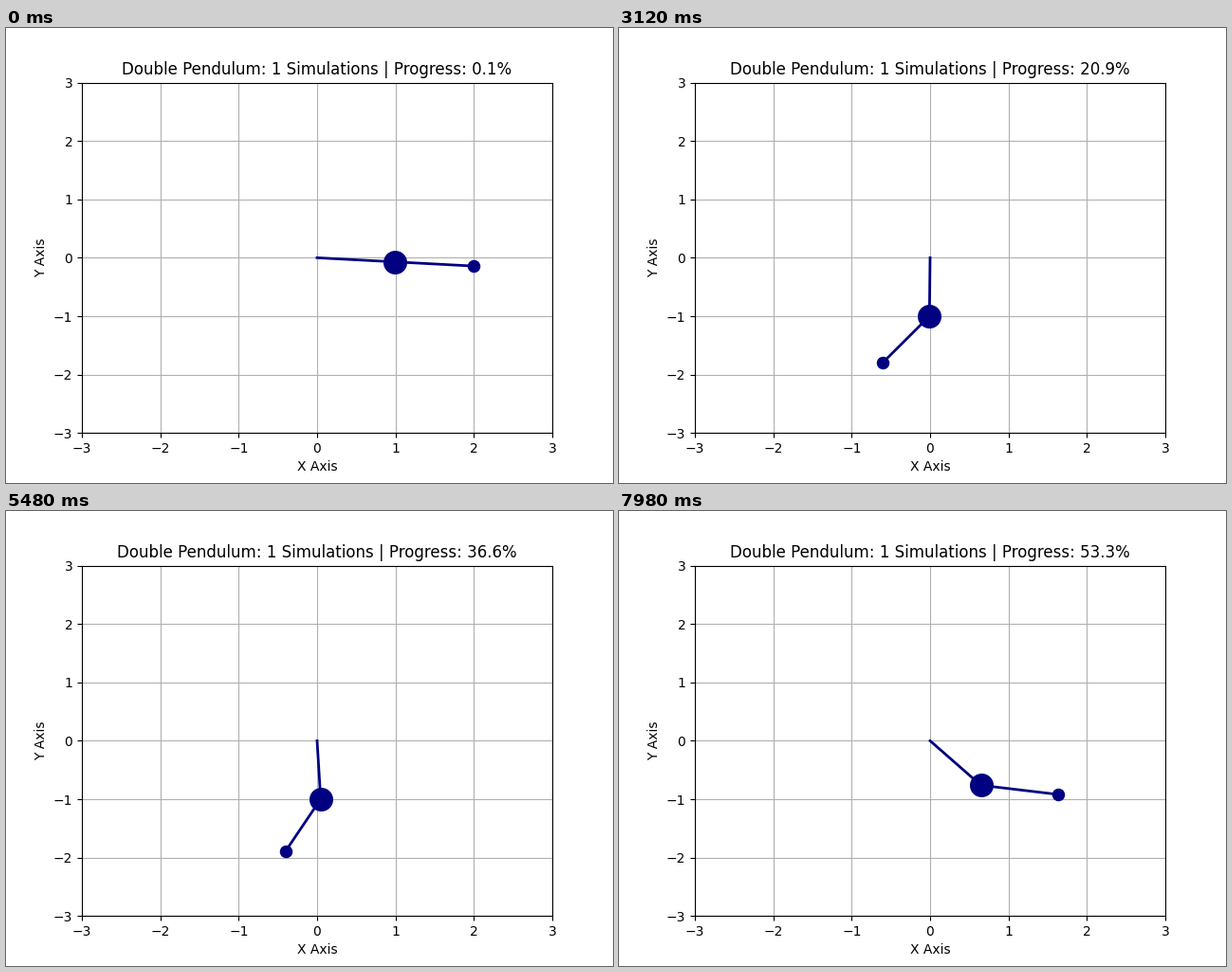
A matplotlib script that plays this animation: 640 px wide and 480 px high, repeating every 8000 ms.

```python
import numpy as np
import matplotlib.pyplot as plt
from matplotlib.animation import FuncAnimation

FRAMES = 400
INTERVAL = 20
TOTAL = 750.5        # frames in the whole simulation run
START = 1.5          # both arms start at this angle, at rest
STEP = 0.015         # integration step, in units of sqrt(length / g)
NAVY = (0, 0, 0.5)

# Known poses: frame number, angle of the first arm, angle of the second arm
POSES = [
    (88, -1.048, -1.949),
    (156, -0.006, -0.623),
    (232, 1.090, 2.135),
    (274, 0.054, -0.467),
    (335, -1.426, -1.425),
    (399, 0.694, 1.408),
]


def derivative(state, r):
    """Equations of motion for unit arms, g = 1 and mass ratio r = m2 / m1."""
    a, b, wa, wb = state
    s, c = np.sin(a - b), np.cos(a - b)
    den = 2 * (1 + r * s * s)
    acc_a = -((2 + r) * np.sin(a) + r * np.sin(a - 2 * b)
              + 2 * s * r * (wb ** 2 + wa ** 2 * c)) / den
    acc_b = 2 * s * ((1 + r) * (wa ** 2 + np.cos(a)) + wb ** 2 * r * c) / den
    return np.array([wa, wb, acc_a, acc_b])


def simulate(r, steps):
    """Angles over time, shape (steps + 1, 2, len(r)), by Runge-Kutta."""
    state = np.zeros((4, len(r)))
    state[:2] = START
    path = [state[:2]]
    for _ in range(steps):
        k1 = derivative(state, r)
        k2 = derivative(state + STEP / 2 * k1, r)
        k3 = derivative(state + STEP / 2 * k2, r)
        k4 = derivative(state + STEP * k3, r)
        state = state + STEP / 6 * (k1 + 2 * k2 + 2 * k3 + k4)
        path.append(state[:2])
    return np.array(path)


def sample(path, pos):
    """Linear interpolation of the path at fractional step numbers."""
    low = np.floor(pos).astype(int)
    mix = (pos - low)[:, None, None]
    return path[low] * (1 - mix) + path[low + 1] * mix


def calibrate(ratios, speeds):
    """Mass ratio and time per frame that meet the known poses best."""
    steps = int(FRAMES * speeds[-1] / STEP) + 2
    path = simulate(ratios, steps)
    error = 0
    for frame, a, b in POSES:
        angles = sample(path, frame * speeds / STEP)
        error = error + 2 - np.cos(angles[:, 0] - a) - np.cos(angles[:, 1] - b)
    i, j = np.unravel_index(np.argmin(error), error.shape)
    return ratios[j], speeds[i], error[i, j]


ratio, speed, _ = calibrate(np.linspace(0.05, 1.5, 291),
                            np.linspace(0.028, 0.056, 701))
ratio, speed, misfit = calibrate(ratio + np.linspace(-0.01, 0.01, 81),
                                 speed + np.linspace(-1e-4, 1e-4, 101))
print(f"mass ratio {ratio:.5f}, time per frame {speed:.6f}, misfit {misfit:.5f}")

course = simulate(np.array([ratio]), int(FRAMES * speed / STEP) + 2)
angles = sample(course, np.arange(FRAMES) * speed / STEP)[:, :, 0]
xs = np.cumsum(np.sin(angles), axis=1)
ys = np.cumsum(-np.cos(angles), axis=1)

fig, ax = plt.subplots(figsize=(6.4, 4.8), dpi=100)
ax.set(xlim=(-3, 3), ylim=(-3, 3), xlabel="X Axis", ylabel="Y Axis")
ax.grid(True)
title = ax.set_title("")
rods, = ax.plot([], [], color=NAVY, lw=2)
bob1, = ax.plot([], [], "o", color=NAVY, ms=17)
bob2, = ax.plot([], [], "o", color=NAVY, ms=8.7)


def update(i):
    (x1, x2), (y1, y2) = xs[i], ys[i]
    rods.set_data([0, x1, x2], [0, y1, y2])
    bob1.set_data([x1], [y1])
    bob2.set_data([x2], [y2])
    title.set_text("Double Pendulum: 1 Simulations | "
                   f"Progress: {(i + 1) / TOTAL:.1%}")
    return rods, bob1, bob2, title


anim = FuncAnimation(fig, update, frames=FRAMES, interval=INTERVAL,
                     repeat=True, repeat_delay=0, blit=False)
plt.show()
```
